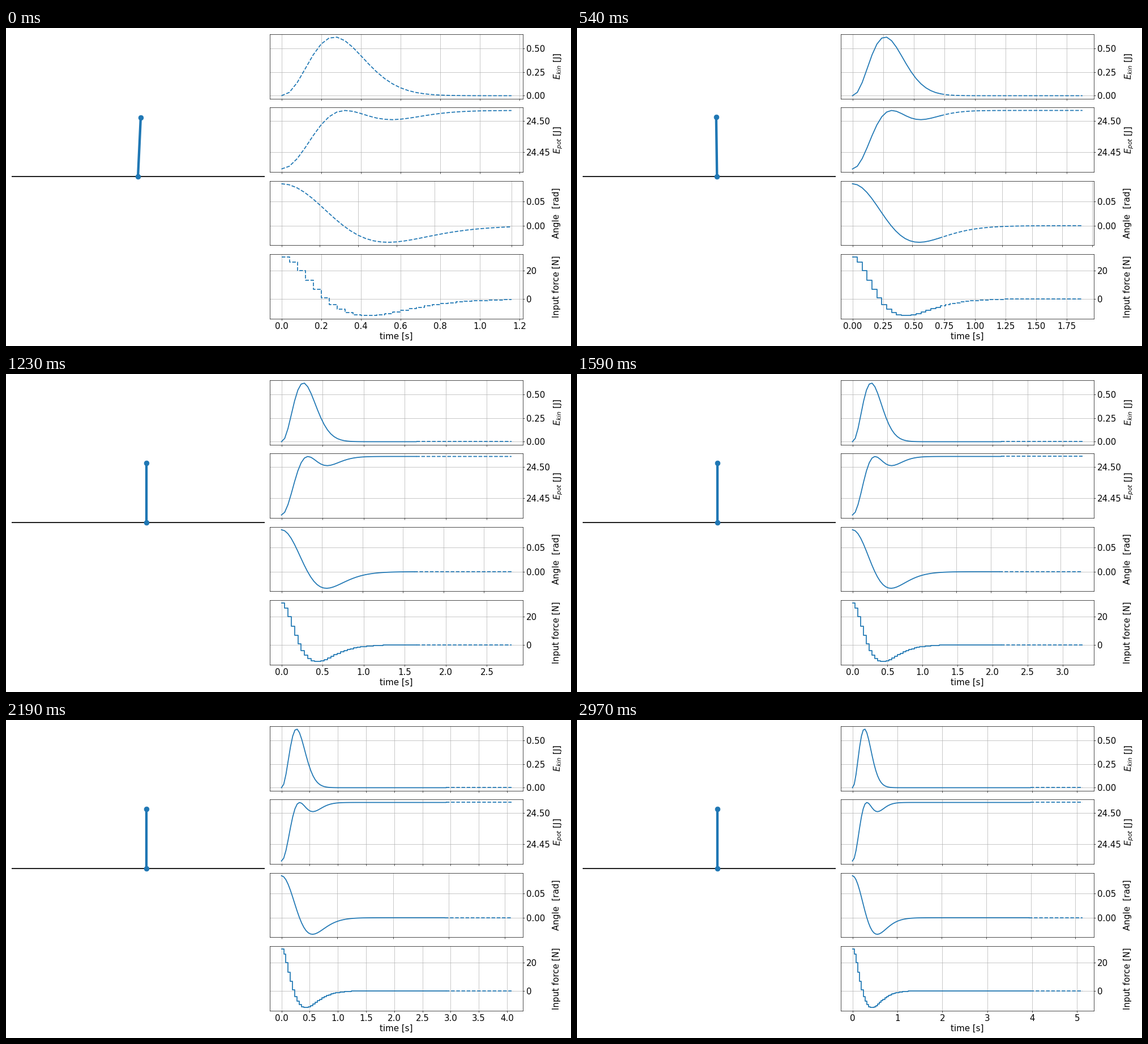
Recreate the animation shown at these times as a matplotlib script. Size 998 by 561 pixels, loop 3 s.

```python
import numpy as np
import matplotlib.pyplot as plt
from matplotlib.animation import FuncAnimation

W, H = 998, 561
DPI = W / 16
DT, HORIZON, FRAMES = 0.04, 30, 100
BLUE = "#1f77b4"

plt.rcParams.update({
    "font.family": "DejaVu Sans",
    "font.size": 17.28,
    "axes.grid": True,
    "lines.linewidth": 2,
})

t = DT * np.arange(FRAMES + HORIZON + 1)


def swing(start, t, crossing, decay):
    """Response that crosses zero once, overshoots and dies out."""
    return start * (1 - (t / crossing)**2) * np.exp(-decay)


theta = swing(np.radians(5), t, 0.323, 5.5 * t**2 / (1 + 0.2 * t**2))

# The input is held constant over each control step.
held = np.maximum(t - DT, 0)
force = swing(29.35, held, 0.207, 6.47 * held**1.32)

s = t / 0.267
e_kin = 0.622 * s**2.15 * np.exp(1.265 * (1 - s**1.7))
e_pot = 2.5 * 9.80665 * np.cos(theta)

# Cart travel follows the speed implied by the kinetic energy.
speed = np.sqrt(e_kin)
cart = np.concatenate([[0], np.cumsum((speed[1:] + speed[:-1]) / 2)])
cart *= 0.268 / cart[-1]

fig = plt.figure(figsize=(W / DPI, H / DPI), dpi=DPI, facecolor="white")


def add_axes(left, top, width, height):
    return fig.add_axes([left / W, 1 - (top + height) / H, width / W, height / H])


scene = add_axes(9.6, 11, 447, 501.5)
scene.set(xlim=(-4, 4), ylim=(-2.4, 2.4))
scene.axis("off")
scene.axhline(0, color="black")
rod, = scene.plot([], [], "-o", color=BLUE, lw=5, ms=10)

PLOTS = [
    ("$E_{kin}$ [J]", e_kin, "default", HORIZON),
    ("$E_{pot}$ [J]", e_pot, "default", HORIZON),
    ("Angle  [rad]", theta, "default", HORIZON + 1),
    ("Input force [N]", force, "steps-pre", HORIZON),
]

panels = []
for row, (label, data, style, count) in enumerate(PLOTS):
    ax = add_axes(466.2, 11 + 129.3 * row, 447, 113.6)
    pad = 0.05 * np.ptp(data)
    ax.set_ylim(data.min() - pad, data.max() + pad)
    ax.yaxis.tick_right()
    ax.yaxis.set_label_position("right")
    ax.set_ylabel(label)
    ax.yaxis.set_label_coords((965 - 466.2) / 447, 0.5)
    ax.tick_params(labelbottom=row == len(PLOTS) - 1)
    past, = ax.plot([], [], color=BLUE, drawstyle=style)
    ahead, = ax.plot([], [], "--", color=BLUE, drawstyle=style)
    panels.append((ax, data, count, past, ahead))
panels[-1][0].set_xlabel("time [s]")


def update(k):
    x, a = cart[k], theta[k]
    rod.set_data([x, x + np.sin(a)], [0, np.cos(a)])
    for ax, data, count, past, ahead in panels:
        end = k + count
        past.set_data(t[:k + 1], data[:k + 1])
        ahead.set_data(t[k:end], data[k:end])
        ax.set_xlim(-0.05 * t[end - 1], 1.05 * t[end - 1])


anim = FuncAnimation(fig, update, frames=FRAMES, interval=30,
                     repeat=True, repeat_delay=0, blit=False)
plt.show()
```
